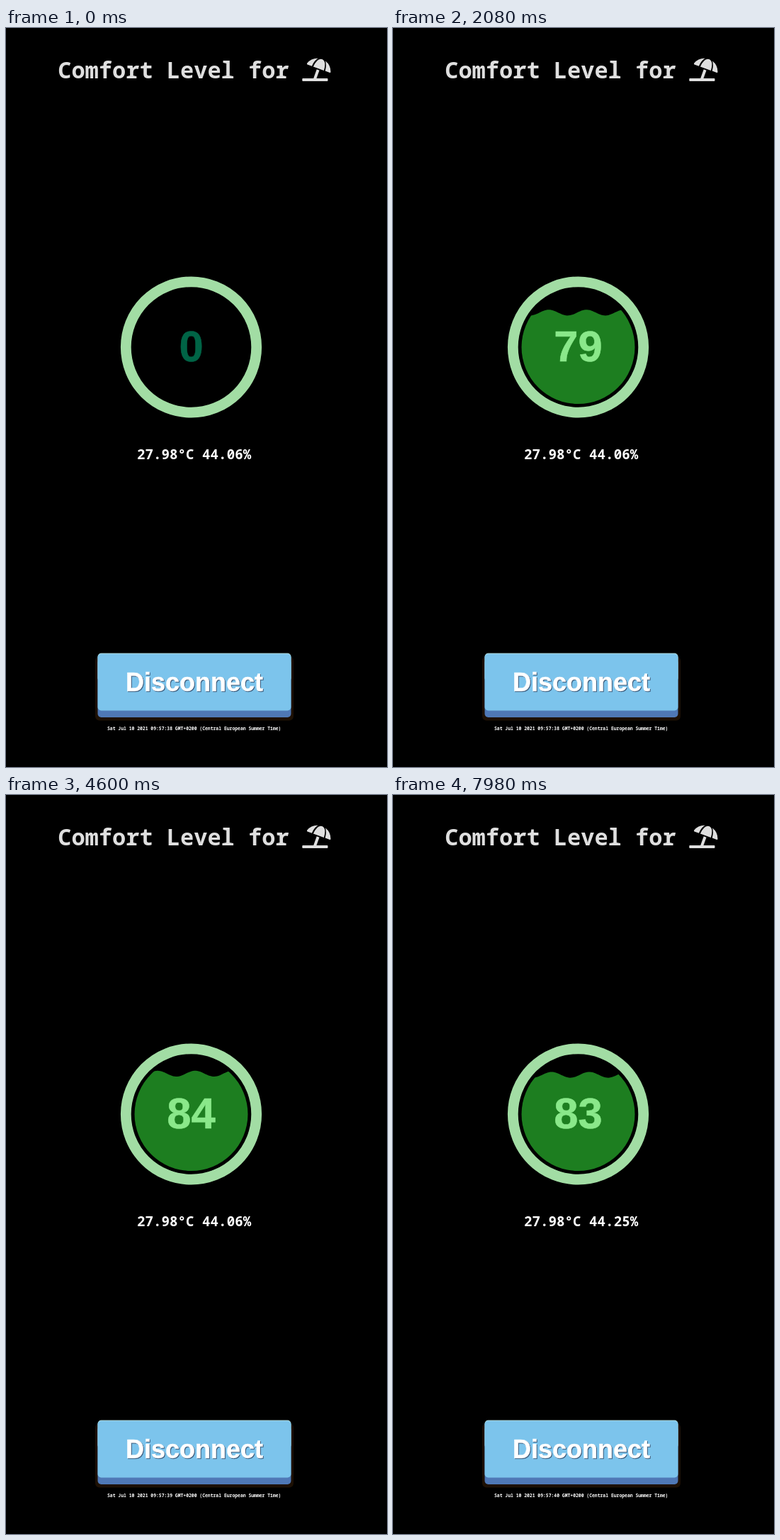
Recreate the animation shown at these times as an HTML page. Size 538 by 1042 pixels, loop 8000 ms.

```html
<!DOCTYPE html>
<html lang="en">
<head>
<meta charset="utf-8">
<title>Comfort Level</title>
<style>
  html, body { margin: 0; width: 100%; height: 100%; overflow: hidden; background: #000; }
  svg { display: block; }
  text { font-weight: 700; white-space: pre; }
  .mono { font-family: "Roboto Mono", "Noto Sans Mono", monospace; }
  .sans { font-family: "Liberation Sans", Arial, sans-serif; text-anchor: middle; }
  .level { font-size: 61.5px; stroke: currentColor; stroke-width: .6; fill: currentColor; }
  .label { font-size: 36px; stroke: currentColor; stroke-width: .5; fill: currentColor; }
</style>
</head>
<body>
<svg width="538" height="1042" viewBox="0 0 538 1042">
  <defs>
    <clipPath id="waterClip"><path id="wave"/></clipPath>
  </defs>

  <g fill="#dfdfdf">
    <text class="mono" x="73.2" y="71" font-size="32">Comfort Level for</text>
    <path transform="translate(418.3 42.8) scale(.0628)"
      d="M115 137L217 174Q272 45 356 0Q200 -5 108 112Q100 130 115 137Z
         M248 185L486 272Q552 58 443 18Q340 -15 248 185Z
         M521 60Q553 150 516 283L618 320Q638 324 640 306Q640 150 521 60Z
         M326 248L386 270L321 448H560Q576 448 576 464V496Q576 512 560 512H16Q0 512 0 496V464Q0 448 16 448H253Z"/>
  </g>

  <circle cx="261.5" cy="450" r="92.2" fill="none" stroke="#a2dda4" stroke-width="14.8"/>
  <text class="sans level" x="261.5" y="469.5" color="#006446"></text>
  <g clip-path="url(#waterClip)">
    <circle cx="261.5" cy="450" r="80" fill="#1d7e20"/>
    <text class="sans level" x="261.5" y="469.5" color="#8ae88a"></text>
  </g>

  <text class="mono" id="reading" x="185" y="607.5" font-size="19.2" fill="#fff"></text>

  <rect x="126" y="886" width="280" height="90.5" rx="6" fill="#1d1004"/>
  <rect x="129.5" y="890" width="273" height="82" rx="5" fill="#4f78b6"/>
  <rect x="129.5" y="881.5" width="273" height="40" rx="5" fill="#b4e2e4"/>
  <rect x="129.5" y="882.5" width="273" height="80" rx="5" fill="#7cc4ec"/>
  <text class="sans label" x="267" y="936" color="#3b5878">Disconnect</text>
  <text class="sans label" x="266" y="934.5" color="#fff">Disconnect</text>
  <text class="mono" id="clock" x="143" y="989.5" font-size="6.4" fill="#fff"></text>
</svg>
<script>
const LOOP = 8000, RISE = 3000, TICKS = [2500, 5400];
const WAVE_LENGTH = 53.1, WAVE_HEIGHT = 4.1, WAVE_SPEED = 0.01867;
const byId = id => document.getElementById(id);
const levels = document.querySelectorAll('.level');

function ease(u) {
  u = Math.min(1, Math.max(0, u));
  return u < 0.5 ? 4 * u ** 3 : 1 - 4 * (1 - u) ** 3;
}

function wavePath(level, t) {
  const base = 534 - 1.68 * level;
  const crest = 253 + (t - 1000) * WAVE_SPEED;
  let d = 'M178 560';
  for (let x = 178; x <= 346; x += 2) {
    const y = base - WAVE_HEIGHT * Math.cos((x - crest) / WAVE_LENGTH * 2 * Math.PI);
    d += `L${x} ${y.toFixed(2)}`;
  }
  return d + 'V560Z';
}

function draw(now) {
  const t = now % LOOP;
  const level = 84 * ease((t + 180) / RISE) - ease((t - TICKS[1]) / RISE);
  const seconds = 38 + TICKS.filter(tick => t >= tick).length;
  levels.forEach(el => el.textContent = Math.round(level));
  byId('wave').setAttribute('d', wavePath(level, t));
  byId('reading').textContent = `27.98°C ${t < TICKS[1] ? '44.06' : '44.25'}%`;
  byId('clock').textContent =
    `Sat Jul 10 2021 09:57:${seconds} GMT+0200 (Central European Summer Time)`;
}

const start = performance.now();
function tick() {
  draw(performance.now() - start);
  requestAnimationFrame(tick);
}
tick();
</script>
</body>
</html>
```
